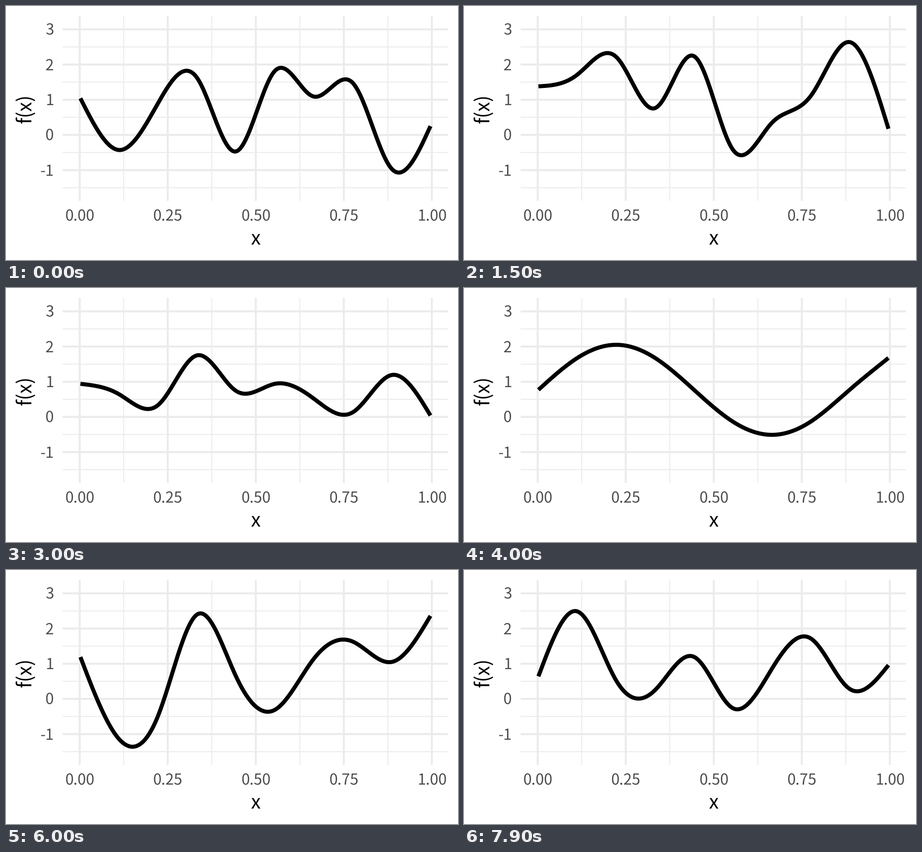
Animation of 998 by 561 pixels, one loop 8 s. Source, as a matplotlib script:

```python
import numpy as np
import matplotlib.pyplot as plt
from matplotlib.animation import FuncAnimation

WIDTH, HEIGHT, DPI = 998, 561, 64
PT = 72 / DPI  # points per pixel
KNOTS = 10
LEFT, RIGHT = 164.3, 937.2

plt.rcParams["text.hinting"] = "none"
plt.rcParams["font.family"] = ["Noto Sans CJK JP", "DejaVu Sans"]


def x_pixel(value):
    return 162.7 + 777.6 * value


def y_pixel(value):
    return 284.7 - 77.7 * value


def natural_spline(heights, t):
    """Natural cubic spline through heights at t = 0, 1, 2, ..."""
    inner = len(heights) - 2
    system = 4 * np.eye(inner) + np.eye(inner, k=1) + np.eye(inner, k=-1)
    bend = np.pad(np.linalg.solve(system, 6 * np.diff(heights, 2)), 1)
    i = np.minimum(t.astype(int), inner)
    b = t - i
    a = 1 - b
    return (a * heights[i] + b * heights[i + 1]
            + ((a**3 - a) * bend[i] + (b**3 - b) * bend[i + 1]) / 6)


def wave(middle, swing, period):
    return middle + swing * np.sin(2 * np.pi * np.arange(KNOTS) / period)


# Each function is known at ten evenly spaced places
STATES = np.array([
    [1.04, -0.43, 0.91, 1.62, -0.47, 1.82, 1.09, 1.48, -0.96, 0.25],
    [1.39, 1.75, 2.25, 0.74, 2.25, -0.43, 0.35, 1.10, 2.65, 0.16],
    wave(0.89, -1.18, 4.5),
    [0.94, 0.64, 0.34, 1.75, 0.74, 0.94, 0.52, 0.13, 1.19, 0.04],
    wave(0.77, 1.28, 8),
    [2.03, 0.83, 1.06, 0.63, 0.18, 0.41, 1.54, 1.01, 1.24, 1.35],
    [1.19, -1.15, -0.47, 2.40, 0.64, -0.31, 1.14, 1.63, 1.05, 2.36],
    [2.27, 0.25, 0.09, 2.47, 0.44, 1.62, 0.91, 1.19, 1.64, 0.43],
    [0.61, 2.53, 0.53, 0.21, 1.21, -0.30, 0.85, 1.73, 0.26, 0.97],
])

fig = plt.figure(figsize=(WIDTH / DPI, HEIGHT / DPI), dpi=DPI, facecolor="white")
ax = fig.add_axes([0, 0, 1, 1])
ax.set_xlim(0, WIDTH)
ax.set_ylim(HEIGHT, 0)
ax.axis("off")


def grid(xs, ys, width):
    style = dict(color="#EBEBEB", lw=width * PT, solid_capstyle="butt", snap=False)
    for x in xs:
        ax.plot([x_pixel(x)] * 2, [22, 430.5], **style)
    for y in ys:
        ax.plot([125, 976], [y_pixel(y)] * 2, **style)


def label(x, y, text, size, color, ha="center", rotation=0):
    ax.text(x, y, text, fontsize=size * PT, color=color, ha=ha, va="baseline",
            rotation=rotation, rotation_mode="anchor")


x_ticks = np.arange(5) / 4
y_ticks = range(-1, 4)
grid(x_ticks[:-1] + 0.125, np.arange(-1.5, 3), 2.1)
grid(x_ticks, y_ticks, 4.3)
for x in x_ticks:
    label(x_pixel(x), 474.5, f"{x:.2f}", 33.5, "#4D4D4D")
for y in y_ticks:
    label(105.3, y_pixel(y) + 12.3, str(y), 33.5, "#4D4D4D", ha="right")
label(551, 527, "x", 43, "black")
label(55, 227, "f(x)", 43, "black", rotation=90)

knot_position = np.linspace(0, KNOTS - 1, 260)
curve_x = np.linspace(LEFT, RIGHT, 260)
line, = ax.plot([], [], color="black", lw=8.9 * PT, solid_capstyle="butt",
                solid_joinstyle="round", zorder=5)


def ease(t):
    return 4 * t**3 if t < 0.5 else 1 - 4 * (1 - t)**3


def draw(frame):
    state, step = divmod(frame, 10)
    wait = 4 if state else 3
    s = ease(max(0, (step - wait) / (10 - wait)))
    heights = (1 - s) * STATES[state] + s * STATES[state + 1]
    line.set_data(curve_x, y_pixel(natural_spline(heights, knot_position)))
    return line,


animation = FuncAnimation(fig, draw, frames=80, interval=100, repeat=True,
                          repeat_delay=0)
plt.show()
```
